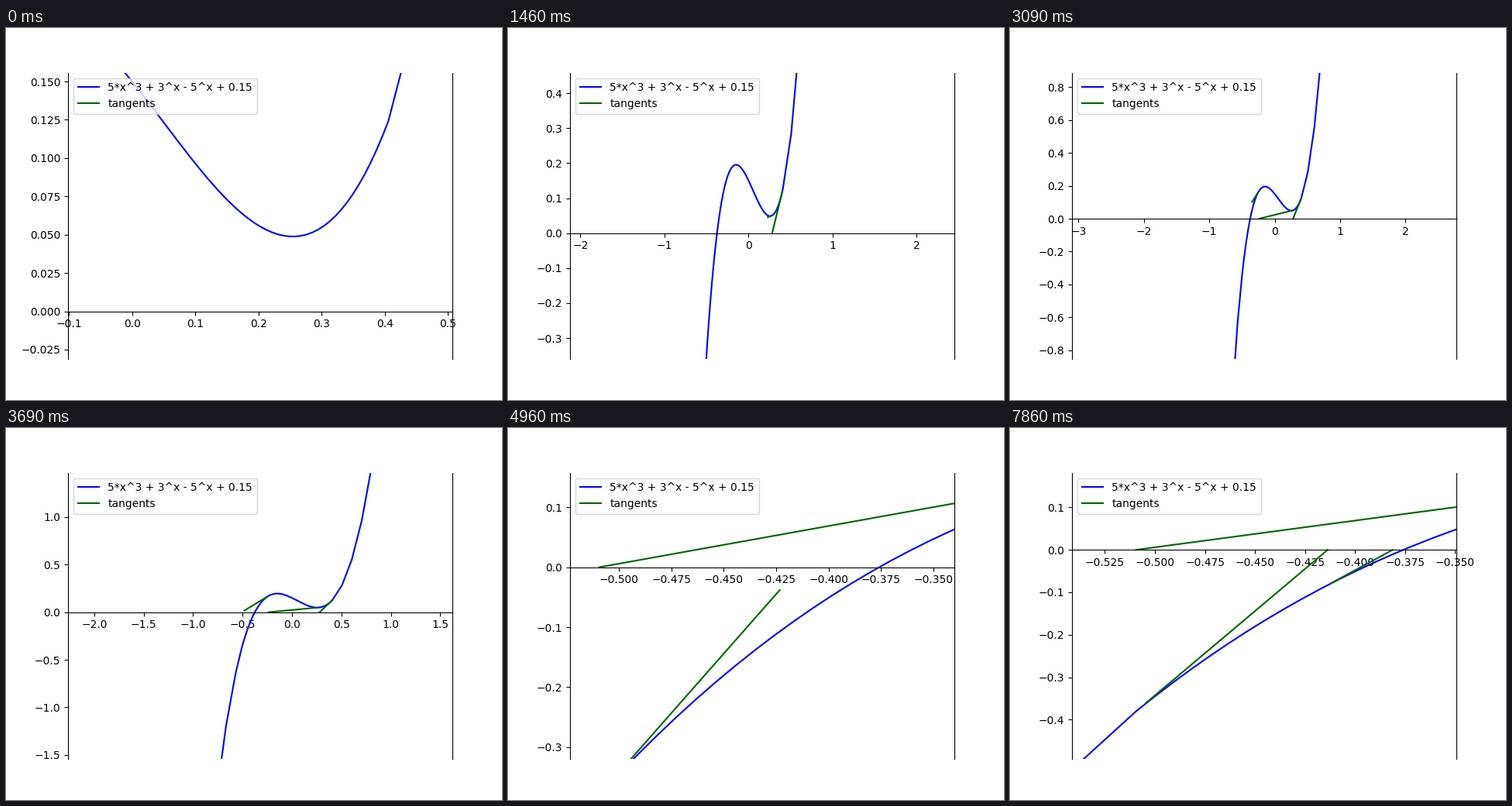
Recreate the animation shown at these times as a matplotlib script. Size 640 by 480 pixels, loop 8320 ms.

```python
import numpy as np
import matplotlib.pyplot as plt
from matplotlib.animation import FuncAnimation

LOOP, INTERVAL = 8320, 20
STEPS = 20                      # drawing steps per tangent
SEGMENT, HOLD, STEP = 1270, 130, 60
ROOTS = [0.4057, 0.280, -0.238, -0.5094, -0.4137, -0.3812]

# step, left, right, bottom, top
CAMERA = np.array([
    [0, -0.1015, 0.507, -0.0312, 0.1558],
    [9, -0.5875, 1.1776, -0.288, 0.398],
    [22, -2.124, 2.447, -0.360, 0.459],
    [40, -3.506, 3.370, -0.400, 0.5037],
    [58, -2.265, 1.622, -1.544, 1.467],
    [61, -2.120, 1.460, -1.573, 1.492],
    [78, -0.5233, -0.340, -0.320, 0.1578],
    [81, -0.515, -0.348, -0.293, 0.140],
    [93, -0.5414, -0.3494, -0.4925, 0.1816],
])


def f(x):
    return 5 * x**3 + 3.0**x - 5.0**x + 0.15


def monotone_slopes(x, y):
    d = np.diff(y) / np.diff(x)
    slopes = np.zeros_like(y)
    for i in range(1, len(y) - 1):
        if d[i - 1] * d[i] > 0:
            slopes[i] = 2 * d[i - 1] * d[i] / (d[i - 1] + d[i])
    slopes[0] = d[0]
    return slopes


KEYS, VIEWS = CAMERA[:, 0], CAMERA[:, 1:]
SLOPES = np.column_stack([monotone_slopes(KEYS, v) for v in VIEWS.T])


def camera(step):
    """Cubic Hermite interpolation of the axis limits."""
    step = min(step, KEYS[-1])
    i = min(np.searchsorted(KEYS, step, side="right") - 1, len(KEYS) - 2)
    h = KEYS[i + 1] - KEYS[i]
    u = (step - KEYS[i]) / h
    return ((1 + 2 * u) * (1 - u)**2 * VIEWS[i]
            + u * (1 - u)**2 * h * SLOPES[i]
            + u * u * (3 - 2 * u) * VIEWS[i + 1]
            - u * u * (1 - u) * h * SLOPES[i + 1])


def step_at(ms):
    segment, rest = divmod(ms, SEGMENT)
    if segment >= len(ROOTS) - 1:
        return STEPS * (len(ROOTS) - 1)
    done = 0 if rest < HOLD else 1 + (rest - HOLD) // STEP
    return int(STEPS * segment + done)


fig, ax = plt.subplots(figsize=(6.4, 4.8), dpi=100)
ax.spines["top"].set_visible(False)
ax.spines["bottom"].set_position("zero")

# dense samples between the outermost iterates, coarse ones outside
xs = np.concatenate([
    np.arange(-3.568, -0.55, 0.1),
    np.linspace(min(ROOTS), ROOTS[0], 100),
    ROOTS[0] + 0.1 * np.arange(1, 32),
])
ax.plot(xs, f(xs), color="blue", label="5*x^3 + 3^x - 5^x + 0.15")
tangents = [ax.plot([], [], color="darkgreen",
                    label="tangents" if i == 0 else None)[0]
            for i in range(len(ROOTS) - 1)]
ax.legend(loc="upper left")


def update(frame):
    step = step_at((frame + 0.5) * INTERVAL)
    left, right, bottom, top = camera(step)
    ax.set_xlim(left, right)
    ax.set_ylim(bottom, top)
    for i, line in enumerate(tangents):
        done = np.clip(step - STEPS * i, 0, STEPS)
        if done < 2:
            line.set_data([], [])
            continue
        u = np.array([1, done]) / STEPS
        a, b = ROOTS[i], ROOTS[i + 1]
        line.set_data(a + (b - a) * u, f(a) * (1 - u))
    return tangents


anim = FuncAnimation(fig, update, frames=LOOP // INTERVAL, interval=INTERVAL,
                     repeat=True, repeat_delay=0)
plt.show()
```
